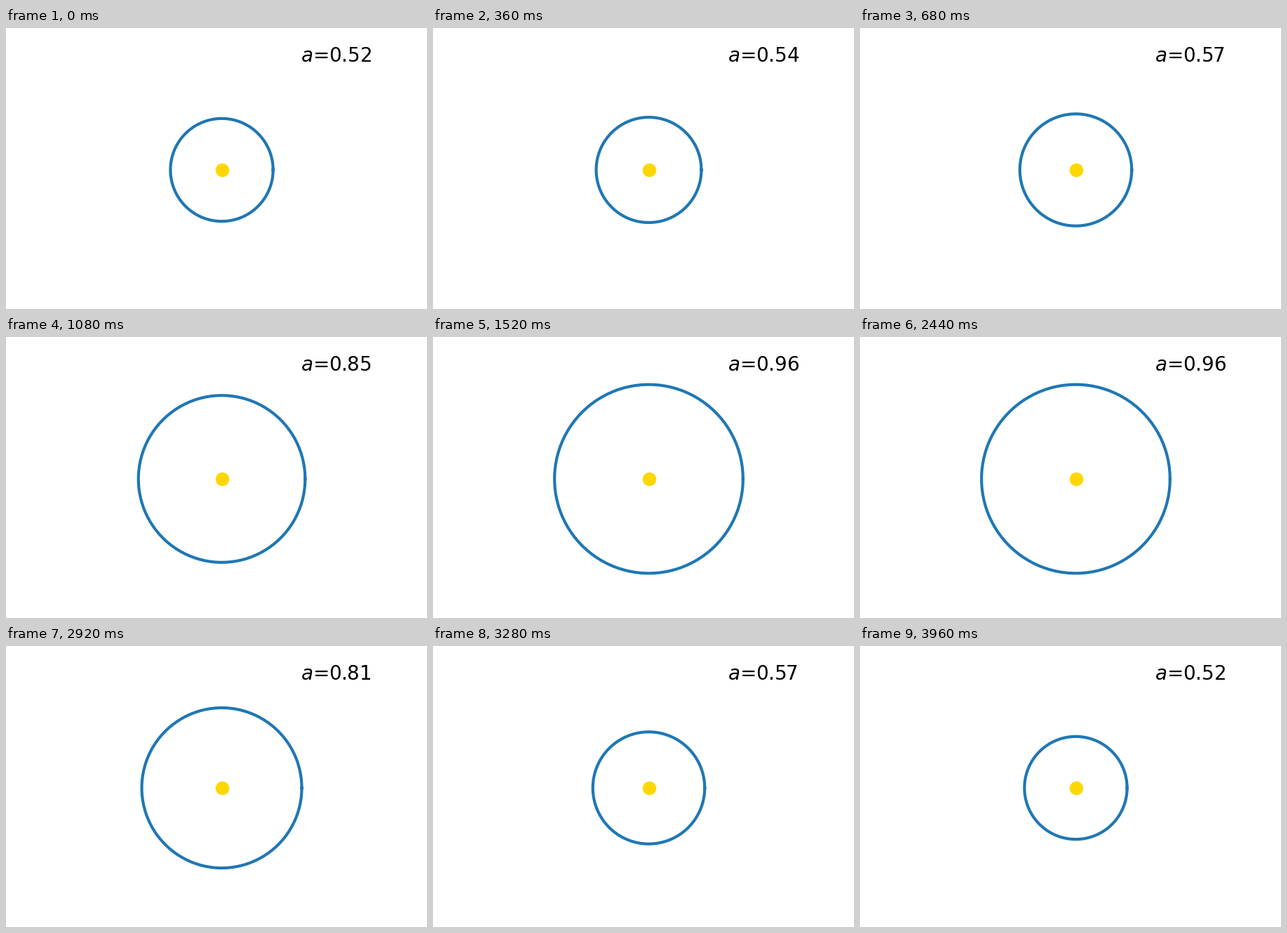
Animation, 600 px wide and 400 px high, one loop 4000 ms. Source, as a matplotlib script:

```python
import numpy as np
import matplotlib.pyplot as plt
from matplotlib.animation import FuncAnimation

FRAMES = 100
HALF = FRAMES // 2
INTERVAL = 40

# Radius rises along an arctan step, then runs back the same way.
rise = 0.75 + np.arctan(np.linspace(-7, 7, HALF)) / (2 * np.pi)
radii = np.concatenate([rise, rise[::-1]])

theta = np.linspace(0, 2 * np.pi, 100)
unit_x, unit_y = np.cos(theta), np.sin(theta)

fig, ax = plt.subplots(figsize=(6, 4), dpi=100)
fig.subplots_adjust(left=0.125, right=0.9, bottom=0.11, top=0.88)
ax.set_ylim(-1.1, 1.1)
ax.set_xlim(-1.1 * 465 / 308, 1.1 * 465 / 308)
ax.axis("off")

orbit, = ax.plot([], [], color="tab:blue", lw=3)
ax.plot(0, 0, "o", color="gold", ms=13)
label = ax.text(0.8, 1.1, "", fontsize=20)


def draw(i):
    a = radii[i]
    orbit.set_data(a * unit_x, a * unit_y)
    label.set_text(f"$a$={a:.2f}")
    return orbit, label


anim = FuncAnimation(fig, draw, frames=FRAMES, interval=INTERVAL,
                     init_func=lambda: draw(0), repeat=True, repeat_delay=0)
plt.show()
```
